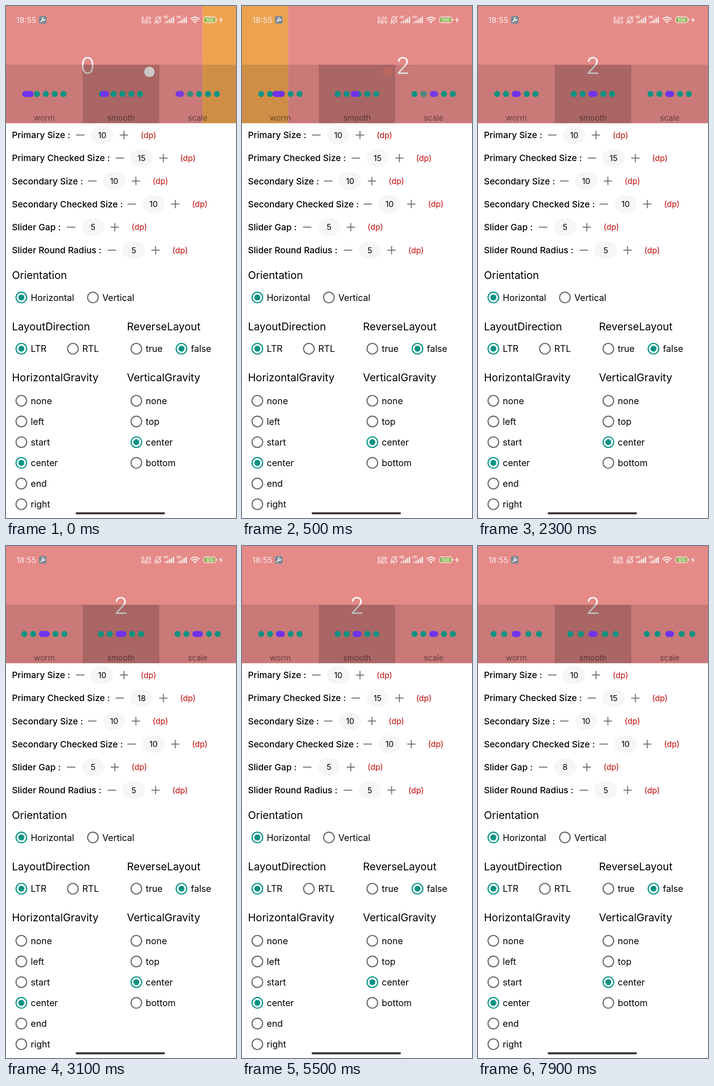
Write an HTML page that moves like this. It is 502 px wide and 1116 px high and loops after 8000 ms.

```html
<!DOCTYPE html>
<html lang="en">
<head>
<meta charset="utf-8">
<title>Indicator settings</title>
<style>
  html, body { margin: 0; width: 100%; height: 100%; overflow: hidden; background: #fff; }
  svg { display: block; width: 502px; height: 1116px; font-family: Inter, Roboto, sans-serif; }
  .label { font-size: 19.3px; font-weight: 500; }
  .heading { font-size: 23px; }
  .option { font-size: 19.6px; }
  .value { font-size: 17.5px; text-anchor: middle; }
  .unit { font-size: 17.5px; fill: #c40b0b; }
  .digit { font-size: 51px; font-weight: 300; fill: #fff; text-anchor: middle; }
  .tab { font-size: 17.2px; fill: #000; opacity: .47; text-anchor: middle; }
  .clock { font-size: 17.5px; }
  .speed { font-size: 9.3px; font-weight: 700; }
</style>
</head>
<body>
<svg id="stage" viewBox="0 0 502 1116"></svg>
<script>
const LOOP = 8000, STEP = 100, W = 502, DP = 1.288;
const TEAL = '#009384', PURPLE = '#7032ee', GREY = '#696969';
const stage = document.getElementById('stage');

function add(parent, tag, attrs = {}, text) {
  const node = document.createElementNS('http://www.w3.org/2000/svg', tag);
  for (const key in attrs) node.setAttribute(key, attrs[key]);
  if (text !== undefined) node.textContent = text;
  parent.append(node);
  return node;
}
const write = (parent, x, y, cls, text) => add(parent, 'text', { x, y, class: cls }, text);
const set = (node, attrs) => { for (const key in attrs) node.setAttribute(key, attrs[key]); };

// Pager
const pager = add(stage, 'g');
['#e58a87', '#eca24f', '#e58a87'].forEach((fill, i) => {
  add(pager, 'rect', { x: i * W, width: W + (i === 2 ? 1 : 0), height: 255.5, fill });
  write(pager, (i + .5) * W, 148, 'digit', i);
});
const tabs = ['worm', 'smooth', 'scale'];
const dots = tabs.map((name, i) => {
  add(stage, 'rect', { x: i * W / 3, y: 128, width: W / 3, height: 127.5, opacity: i === 1 ? .26 : .12 });
  write(stage, (i + .5) * W / 3, 250, 'tab', name);
  return Array.from({ length: 6 }, () => add(stage, 'rect'));
});

// Status bar
const bar = add(stage, 'g', { fill: '#fbeceb', stroke: 'none' });
const line = (d, width = 1.7) =>
  add(bar, 'path', { d, fill: 'none', stroke: '#fbeceb', 'stroke-width': width, 'stroke-linecap': 'round', 'stroke-linejoin': 'round' });
write(bar, 22.5, 36.5, 'clock', '18:55');
add(bar, 'rect', { x: 72, y: 22, width: 16.5, height: 16.5, rx: 4, fill: '#768a96' });
line('M76 34.5L81 29.5', 2.2);
line('M82 25.5a3 3 0 1 0 3 3', 1.8);
const speed = write(bar, 295.5, 29.5, 'speed', '');
write(bar, 295.5, 38.3, 'speed', 'KB/s');
line('M325 34.5q2-2 2-6q0-5 5-5q4.5 0 4.5 5q0 4 2 6zM329.5 37.5h4M324.5 38L339 22.5', 1.6);
[344, 372].forEach(x => {
  add(bar, 'text', { x, y: 26.8, 'font-size': 7.2, 'font-weight': 700 }, 'HD');
  for (let i = 0; i < 5; i++) {
    const h = 3 + i * 2.8;
    add(bar, 'rect', { x: x + 2 + i * 4.5, y: 37.5 - h, width: 3, height: h, rx: 1 });
  }
});
line('M403.5 28q9-7.5 18 0M406.5 31.5q6-5 12 0', 2.4);
add(bar, 'path', { d: 'M408.8 34q3.7-2.6 7.4 0l-3.7 4z' });
add(bar, 'rect', { x: 431, y: 23.5, width: 27, height: 13, rx: 4, fill: 'none', stroke: '#fbeceb', 'stroke-width': 1.3 });
add(bar, 'rect', { x: 433, y: 25.5, width: 23, height: 9, rx: 2, fill: '#73c447' });
add(bar, 'rect', { x: 459, y: 28, width: 2, height: 4, rx: 1 });
add(bar, 'text', { x: 444.5, y: 33.7, 'font-size': 10, 'font-weight': 600, 'text-anchor': 'middle' }, '100');
add(bar, 'path', { d: 'M471 23.5l-6 7.5h4l-1.5 6.5l6-8h-4z' });

// Stepper rows: label, x of minus, resting value, times of the taps
const rows = [
  ['Primary Size :', 162, 10, [1000, 1200, 1400], [1800, 1900, 2100]],
  ['Primary Checked Size :', 248, 15, [2600, 2800, 3000], [3500, 3700, 3900]],
  ['Secondary Size :', 188, 10, [4200, 4400, 4600], [5000, 5200, 5400]],
  ['Secondary Checked Size :', 274, 10, [5800, 6000, 6200], [6500, 6700, 6900]],
  ['Slider Gap :', 142, 5, [7400, 7600, 7800], []],
  ['Slider Round Radius :', 231, 5, [], []],
].map(([label, x, base, ups, downs], i) => {
  const y = 281.2 + i * 50.2;
  write(stage, 13, y + 7, 'label', label);
  add(stage, 'rect', { x: x + 24, y: y - 19, width: 48, height: 38, rx: 19, fill: '#f7f5f6' });
  add(stage, 'path', {
    d: `M${x - 9} ${y}h18.5M${x + 86.5} ${y}h18M${x + 95.5} ${y - 9}v18`,
    stroke: GREY, 'stroke-width': 2, fill: 'none',
  });
  write(stage, x + 132, y + 6.3, 'unit', '(dp)');
  return { x, y, base, ups, downs, text: write(stage, x + 48, y + 6.3, 'value', base) };
});

// Radio groups
[['Orientation', 13, 595], ['LayoutDirection', 13, 706.5], ['ReverseLayout', 264, 706.5],
 ['HorizontalGravity', 13, 818], ['VerticalGravity', 264, 818]]
  .forEach(([text, x, y]) => write(stage, x, y, 'heading', text));

function radio(text, x, y, on) {
  const color = on ? TEAL : GREY;
  add(stage, 'circle', { cx: x, cy: y, r: 11.6, fill: 'none', stroke: color, 'stroke-width': 2.4 });
  if (on) add(stage, 'circle', { cx: x, cy: y, r: 6.5, fill: color });
  write(stage, x + 20.5, y + 7.3, 'option', text);
}
radio('Horizontal', 33.5, 635.3, true);
radio('Vertical', 189.7, 635.3);
radio('LTR', 33.5, 747, true);
radio('RTL', 146, 747);
radio('true', 284.5, 747);
radio('false', 383, 747, true);
['none', 'left', 'start', 'center', 'end', 'right'].forEach((s, i) => radio(s, 33.5, 860.5 + i * 45.1, s === 'center'));
['none', 'top', 'center', 'bottom'].forEach((s, i) => radio(s, 284.5, 860.5 + i * 45.1, s === 'center'));
add(stage, 'rect', { x: 152, y: 1103.5, width: 195, height: 4.5, rx: 2.2, fill: '#363638' });

const touch = add(stage, 'circle', { r: 11.3 });

// Page position at each tick of the two swipes
const swipe = [.145, .5, .85, 1, 1.35, 1.8, 1.93, 1.98, 2];
const pageAt = t => swipe[Math.min(swipe.length - 1, t / STEP)];
const passed = (times, t) => times.filter(at => at <= t).length;

function drawIndicator(mode, shapes, page, sizes) {
  const [size, checked, height, checkedHeight, gap, radius] = sizes.map(v => v * DP);
  const current = Math.floor(page), offset = page - current;
  const pitch = size + gap, extra = checked - size;
  const start = (mode + .5) * W / 3 - (4 * pitch + checked) / 2;
  const place = (shape, x, w, h, fill, opacity = 1) => set(shape, {
    x, width: w, height: h, y: 191.8 - h / 2, rx: Math.min(radius, w / 2, h / 2), fill, opacity,
  });
  const weight = k => k === current ? 1 - offset : k === current + 1 ? offset : 0;

  for (let k = 0; k < 5; k++) {
    const w = mode === 2 ? weight(k) : 0, width = size + extra * w;
    const right = start + k * pitch + checked;
    const x = k > current ? right - width : start + k * pitch;
    const main = w > .5;
    const opacity = w === 0 || w === 1 ? 1 : main ? .9 : Math.max(.3, 1 - 2 * w);
    place(shapes[k], x, width, height + (checkedHeight - height) * w, main ? PURPLE : TEAL, opacity);
  }
  if (mode === 2) return;
  const tail = mode === 0 ? Math.max(0, 2 * offset - 1) : offset;
  const head = mode === 0 ? Math.min(1, 2 * offset) : offset;
  place(shapes[5], start + (current + tail) * pitch, checked + (head - tail) * pitch, checkedHeight, PURPLE);
}

function drawTouch(t) {
  set(touch, { opacity: 0 });
  if (t < 600) {
    const held = t < 200 || t === 400;
    if (held) set(touch, { cx: t ? 300 : 313, cy: 143.5, fill: '#cbc8c7', stroke: 'none', opacity: 1 });
    if (t === 500) set(touch, { cx: 318, cy: 144.5, fill: '#c9695f', stroke: 'none', opacity: .5 });
    return;
  }
  const next = t + STEP;
  for (const { x, y, ups, downs } of rows) {
    const down = downs.includes(next);
    if (down || ups.includes(next))
      set(touch, { cx: down ? x + 2 : x + 96, cy: y + .5, fill: 'rgba(255,255,255,.55)', stroke: '#cdcdcd', 'stroke-width': 1.6, opacity: 1 });
  }
}

function draw(t) {
  const page = pageAt(t);
  pager.setAttribute('transform', `translate(${-page * W} 0)`);
  speed.textContent = t < 1100 ? '0.20' : t < 4000 ? '0.34' : '0.09';
  const sizes = rows.map(r => r.base + passed(r.ups, t) - passed(r.downs, t));
  rows.forEach((r, i) => { r.text.textContent = sizes[i]; });
  dots.forEach((shapes, mode) => drawIndicator(mode, shapes, page, sizes));
  drawTouch(t);
}

const begin = performance.now();
function tick() {
  const t = (performance.now() - begin) % LOOP;
  draw(Math.floor(t / STEP) * STEP);
  requestAnimationFrame(tick);
}
tick();
</script>
</body>
</html>
```
